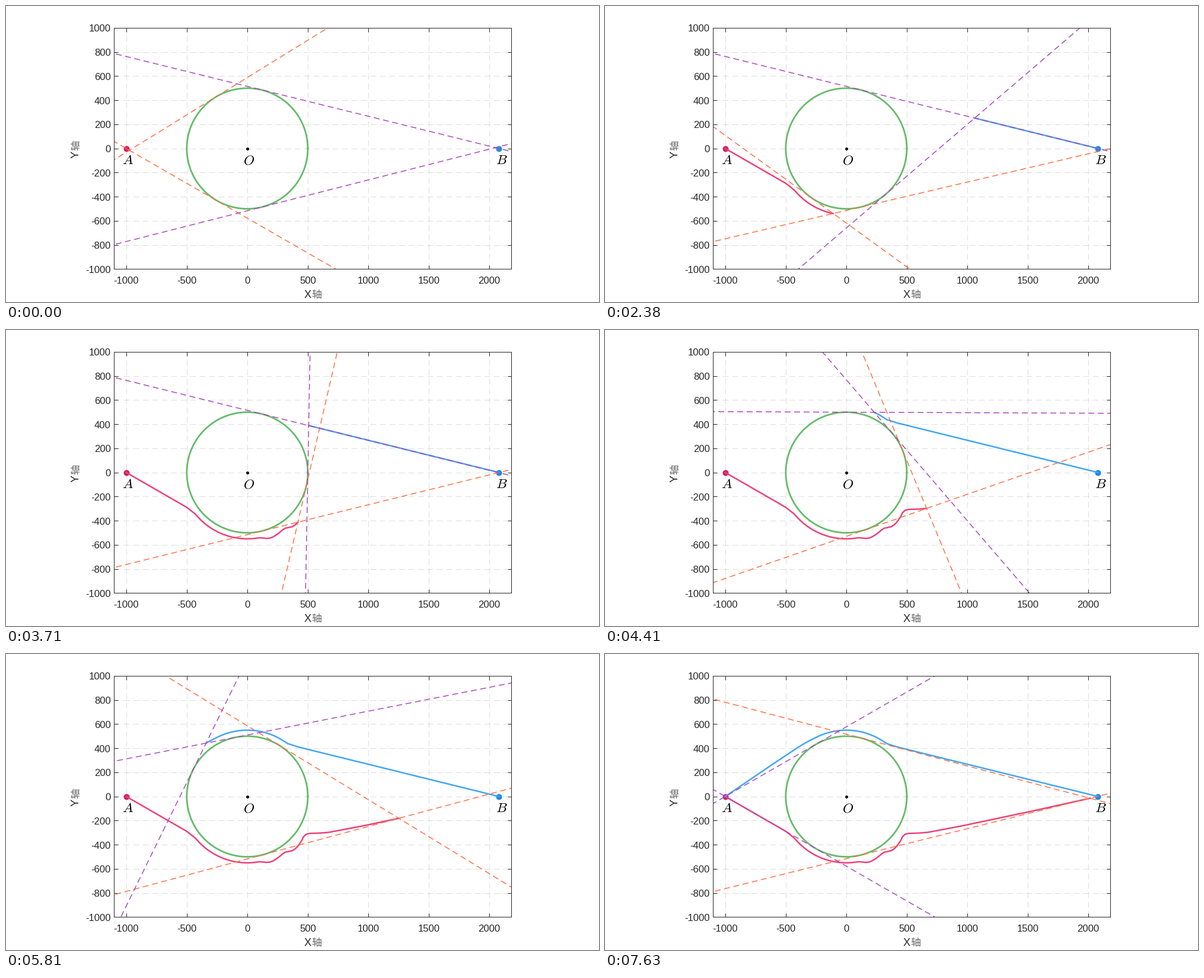
Recreate the animation shown at these times as a matplotlib script. Size 1000 by 500 pixels, loop 7700 ms.

```python
import numpy as np
import matplotlib.pyplot as plt
from matplotlib.animation import FuncAnimation

W, H, DPI = 1000, 500, 100
FRAMES, INTERVAL = 110, 70
RADIUS, ORBIT, STEP = 500, 550, 30
A, B = (-1000, 0), (2080, 0)
XMIN, XMAX, YMAX = -1100, 2183, 1000
INK = "#262626"
LEFT, RIGHT, BOTTOM, TOP = 182.4, 852.4, 444.45, 36.95  # axes edges, px from top left

plt.rcParams["font.family"] = "Liberation Sans"
plt.rcParams["mathtext.fontset"] = "cm"
plt.rcParams["lines.scale_dashes"] = False


def pt(px):
    return px * 72 / DPI


def arc(start, end):
    t = np.radians(np.linspace(start, end, 40))
    return ORBIT * np.column_stack([np.cos(t), np.sin(t)])


def along(points, s):
    """Points at arc lengths s of a polyline, and its full length."""
    d = np.r_[0, np.cumsum(np.hypot(*np.diff(points, axis=0).T))]
    return np.column_stack([np.interp(s, d, c) for c in points.T]), d[-1]


def smooth(points, half=2):
    """Round the corners of a polyline with a moving average."""
    length = along(points, [0])[1]
    dense = along(points, np.linspace(0, length, int(length / 5)))[0]
    kernel = np.ones(2 * half + 1) / (2 * half + 1)
    cols = [np.convolve(np.pad(c, half, mode="reflect", reflect_type="odd"),
                        kernel, mode="valid") for c in dense.T]
    return np.column_stack(cols)


def walk(points):
    """Start point plus one position per frame at constant speed."""
    path = smooth(np.vstack(points))
    s = STEP * np.arange(FRAMES + 1.0)
    length = along(path, [0])[1]
    s[length - s < STEP] = length
    return along(path, s)[0]


def tangents(p):
    """The two tangent lines from p to the circle, drawn left to right."""
    mid = np.arctan2(p[1], p[0])
    half = np.arccos(min(1, RADIUS / np.hypot(*p)))
    for a in (mid - half, mid + half):
        n = np.array([np.cos(a), np.sin(a)])
        d = np.array([-n[1], n[0]])
        if d[0] < 0:
            d = -d
        yield np.array([RADIUS * n - 4000 * d, RADIUS * n + 4000 * d])


lower = walk([
    A, (-500, -288.7), arc(-141, -79),
    [(136, -544), (175, -548), (204, -539), (234, -522), (268, -497),
     (297, -471), (322, -457), (361, -455), (391, -439), (418, -413),
     (435, -387), (450, -366), (462, -336), (479, -315), (503, -307),
     (538, -305), (601, -303.5), (675, -297), (959, -243), (1540, -120)],
    B])
upper = walk([
    B, (425, 409.5), arc(53, 117),
    [(-310, 460), (-379, 420), (-593, 278)], A])

fig = plt.figure(figsize=(W / DPI, H / DPI), dpi=DPI, facecolor="white")
ax = fig.add_axes([LEFT / W, 1 - BOTTOM / H, (RIGHT - LEFT) / W, (BOTTOM - TOP) / H])
ax.set(xlim=(XMIN, XMAX), ylim=(-YMAX, YMAX),
       xticks=range(-1000, 2001, 500), yticks=range(-1000, 1001, 200))
ax.set_axisbelow(True)
ax.grid(color=INK, alpha=0.15, lw=pt(1), dashes=(pt(10), pt(6)))
ax.tick_params(direction="in", length=pt(6.5), width=pt(1), color=INK,
               top=True, right=True, labelbottom=False, labelleft=False)
for spine in ax.spines.values():
    spine.set(color=INK, linewidth=pt(1))


def label(x, y, text, size, color=INK, **kw):
    """Text with its baseline at a pixel position."""
    fig.text(x / W, 1 - y / H, text, fontsize=pt(size), color=color,
             va="baseline", rotation_mode="anchor", **kw)


for v in ax.get_xticks():
    x = LEFT + (v - XMIN) / (XMAX - XMIN) * (RIGHT - LEFT)
    label(x, 469, str(int(v)), 16.67, ha="center")
for v in ax.get_yticks():
    y = BOTTOM - (v + YMAX) / (2 * YMAX) * (BOTTOM - TOP)
    label(176.5, y + 6.5, str(int(v)), 16.67, ha="right")

CJK = dict(family="Noto Sans CJK JP", color="#666666")
label(503, 493, "X", 18.3)
label(515.5, 493, "轴", 17, **CJK)
label(123, 257, "Y", 18.3, rotation=90)
label(123, 243.5, "轴", 17, rotation=90, **CJK)

t = np.linspace(0, 2 * np.pi, 300)
ax.plot(RADIUS * np.cos(t), RADIUS * np.sin(t), color="#66BB6A", lw=pt(2.8))


def dot(p, color, px):
    ax.plot(*p, "o", color=color, ms=pt(px), mew=0)


dot((0, 0), "black", 5)
dot(A, "#D81B60", 10)
dot(B, "#1E88E5", 10)
for x, name in ((196, "A"), (400, "O"), (825.5, "B")):
    label(x, 267, f"${name}$", 23.3, color="black")


def mover(path, trail_color, ray_color):
    trail, = ax.plot([], [], color=trail_color, lw=pt(2.5))
    rays = [ax.plot([], [], color=ray_color, lw=pt(1.5), zorder=2.2,
                    dashes=(pt(10), pt(6)))[0] for _ in range(2)]
    return path, trail, rays


movers = [mover(lower, "#EC407A", "#FF7043"), mover(upper, "#42A5F5", "#AB47BC")]


def update(i):
    artists = []
    for path, trail, rays in movers:
        trail.set_data(*path[:i + 2].T)
        for ray, line in zip(rays, tangents(path[i + 1])):
            ray.set_data(*line.T)
        artists += [trail, *rays]
    return artists


anim = FuncAnimation(fig, update, frames=FRAMES, interval=INTERVAL,
                     repeat=True, repeat_delay=0, blit=False)
plt.show()
```
